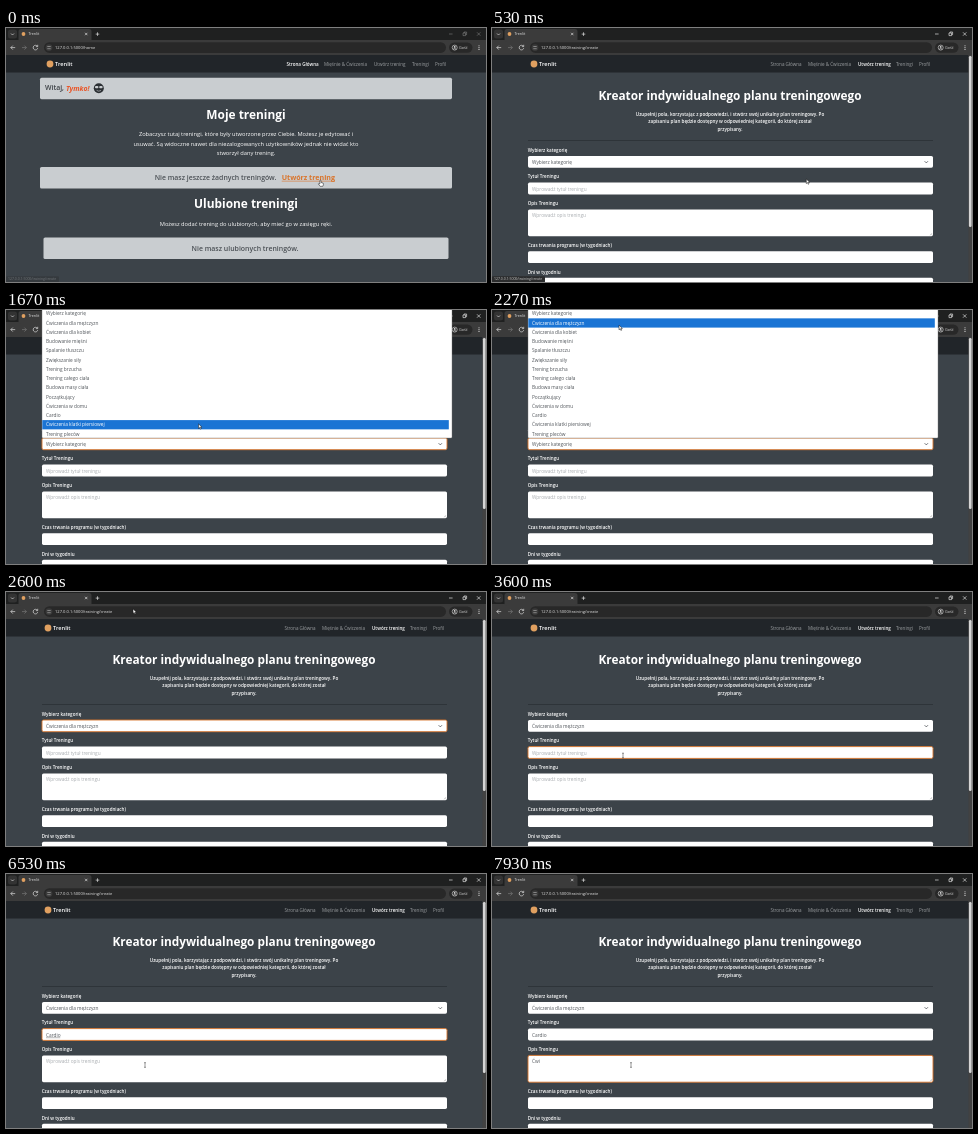
An HTML page that plays this animation: 480x254 px, repeating every 8000 ms.

```html
<!DOCTYPE html>
<html lang="pl">
<head>
<meta charset="utf-8">
<title>Trenlit</title>
<style>
html, body { margin: 0; height: 100%; overflow: hidden; background: #3c4349; }
svg { display: block; width: 100vw; height: 100vh; }
text { font-family: "Open Sans", "Noto Sans", sans-serif; white-space: pre; }
</style>
</head>
<body>
<svg id="stage" viewBox="0 0 480 254"></svg>
<script>
const W = '#fff', DARK = '#212529', BG = '#3c4349', GREY = '#9da0a3';
const ORANGE = '#d9742b', SKIN = '#e0a060', INK = '#50555a', HINT = '#a9adb1';
const LOOP = 8000;

// y is the middle of the capitals
const text = (x, y, s, size, fill = W, weight = 400, extra = '') =>
  `<text x="${x}" y="${y + size * .36}" font-size="${size}" fill="${fill}" font-weight="${weight}" ${extra}>${s}</text>`;
const mid = (x, y, s, size, fill, weight) =>
  text(x, y, s, size, fill, weight, 'text-anchor="middle"');
const rect = (x, y, w, h, fill, r = 0, extra = '') =>
  `<rect x="${x}" y="${y}" width="${w}" height="${h}" rx="${r}" fill="${fill}" ${extra}/>`;
const line = (d, stroke = '#ddd', width = .7) =>
  `<path d="${d}" fill="none" stroke="${stroke}" stroke-width="${width}"/>`;
const dot = (x, y, r, fill) => `<circle cx="${x}" cy="${y}" r="${r}" fill="${fill}"/>`;
const group = (id, body) => `<g id="${id}">${body}</g>`;

const navItems = [[280.5, 'Strona Główna'], [318, 'Mięśnie &amp; Ćwiczenia'],
  [368, 'Utwórz trening'], [406, 'Treningi'], [429, 'Profil']];
const nav = (active, dx) => rect(0, 27, 480, 17.5, DARK) +
  dot(44 + dx, 36, 3.4, SKIN) + text(49 + dx, 36, 'Trenlit', 5.7, W, 600) +
  navItems.map(([x, s], i) =>
    text(x + dx, 36, s, 4.55, i == active ? W : GREY, i == active ? 600 : 400)).join('');

const browser = rect(0, 0, 480, 13, '#1f2020') + rect(0, 12, 480, 15, '#3b3b3b') +
  rect(2, 1.5, 9, 9, '#333', 2.5) + line('M5 5.5l1.5 1.5 1.5-1.5') +
  rect(12.5, 1, 73, 13, '#3b3b3b', 2.5) + dot(17.5, 6, 1.9, SKIN) +
  text(22.5, 6, 'Trenlit', 3.7, '#e8e8e8') +
  line('M79 4.8l2.4 2.4m0-2.4l-2.4 2.4M91.5 4.3v3.6m-1.8-1.8h3.6') +
  group('winButtons', line('M443 6h3.6M457 5h2.6v2.6h-2.6zM458 5v-1h2.6v2.6h-1M471 4.3l3.4 3.4m0-3.4l-3.4 3.4')) +
  line('M9.2 19.6H4.8m2-2l-2 2 2 2') +
  line('M16 19.6h4.4m-2-2l2 2-2 2', '#777') +
  line('M31.3 18.2a2.3 2.3 0 1 0 .4 2M31.7 16.8v1.8h-1.8') +
  rect(38, 14.3, 402, 10.6, '#282828', 5.3) + dot(43, 19.6, 3.4, '#3b3b3b') +
  line('M41.3 18.5h3.4m-3.4 2.2h3.4', '#ccc', .5) +
  `<text id="url" x="49" y="21.1" font-size="4.1" fill="#e4e4e4"></text>` +
  rect(443, 14.4, 23.5, 10.4, '#282828', 5.2) +
  `<circle cx="448.7" cy="19.6" r="2.5" fill="none" stroke="#ddd" stroke-width=".6"/>` +
  dot(448.7, 18.9, .9, '#ddd') + line('M447.2 21.2q1.5-1.3 3 0') + text(453, 19.6, 'Gość', 3.8, '#ddd') +
  [17.8, 19.6, 21.4].map(y => dot(473, y, .55, '#ddd')).join('');

const alertBox = (x, y, w) => rect(x, y, w, 21.5, '#c9cdd0', 1.6);
const home = rect(0, 27, 480, 227, BG) + nav(0, 0) +
  alertBox(34, 49.7, 412) + text(39, 60, 'Witaj,', 6.9, '#3d4246', 600) +
  text(60, 60, 'Tymko!', 7, '#ea5426', 700, 'font-style="italic"') +
  dot(92.8, 60.2, 5, '#2b2f33') + rect(89, 58, 3.4, 2.2, '#c9cdd0', .9) +
  rect(93.2, 58, 3.4, 2.2, '#c9cdd0', .9) + line('M90.6 62.4q2.2 1.6 4.4 0', '#c9cdd0', .6) +
  mid(240, 87, 'Moje treningi', 11.9, W, 700) +
  ['Zobaczysz tutaj treningi, które były utworzone przez Ciebie. Możesz je edytować i',
   'usuwać. Są widoczne nawet dla niezalogowanych użytkowników jednak nie widać kto',
   'stworzył dany trening.'].map((s, i) => mid(240, 106.3 + i * 9.4, s, 5.73)).join('') +
  alertBox(34, 139, 412) + text(148.7, 149.3, 'Nie masz jeszcze żadnych treningów.', 6.9, '#4b5055', 600) +
  text(275.7, 149.3, 'Utwórz trening', 7.1, ORANGE, 700) + rect(275.7, 152.8, 53.3, .6, ORANGE) +
  mid(240, 176, 'Ulubione treningi', 11.9, W, 700) +
  mid(240, 196, 'Możesz dodać trening do ulubionych, aby mieć go w zasięgu ręki.', 5.73) +
  alertBox(37.5, 209.5, 405) + mid(239, 220, 'Nie masz ulubionych treningów.', 6.95, '#4b5055', 600);

const field = (id, y, h) => rect(36, y, 405, h, W, 1.6, `id="${id}" stroke-width=".9"`);
const value = (id, y) => `<text id="${id}" x="40" y="${y + 1.7}" font-size="4.77"></text>`;
const form = rect(0, 27, 480, 227, BG) + nav(2, -2) +
  mid(238, 67.5, 'Kreator indywidualnego planu treningowego', 11.82, W, 700) +
  ['Uzupełnij pola, korzystając z podpowiedzi, i stwórz swój unikalny plan treningowy. Po',
   'zapisaniu plan będzie dostępny w odpowiedniej kategorii, do której został',
   'przypisany.'].map((s, i) => mid(238, 86.2 + i * 7.5, s, 4.62, W, 600)).join('') +
  rect(36, 112.2, 405, .6, '#262b30') +
  [[122, 'Wybierz kategorię'], [148.8, 'Tytuł Treningu'], [175.5, 'Opis Treningu'],
   [217, 'Czas trwania programu (w tygodniach)'], [244, 'Dni w tygodniu']]
    .map(([y, s]) => text(35.7, y, s, 4.55, W, 600)).join('') +
  field('select', 128, 11.7) + field('title', 154.6, 11.8) + field('about', 181.4, 26.8) +
  field('weeks', 223.2, 11.7) + field('days', 249.7, 11.7) +
  line('M432.6 133.2l1.7 1.7 1.7-1.7', '#343a40', .7) + line('M440 205.2l-2 2m2-1l-1 1', '#888', .4) +
  value('selectText', 134) + value('titleText', 160.8) + value('aboutText', 187.5) +
  rect(40, 163.6, 14.2, .5, '#777', 0, 'id="underline"') +
  rect(476.4, 27, 3.6, 227, '#424242') + rect(476.9, 28, 2.7, 171, '#d5d5d5', 1.3);

const options = ['Wybierz kategorię', 'Ćwiczenia dla mężczyzn', 'Ćwiczenia dla kobiet', 'Budowanie mięśni',
  'Spalanie tłuszczu', 'Zwiększanie siły', 'Trening brzucha', 'Trening całego ciała', 'Budowa masy ciała',
  'Początkujący', 'Ćwiczenia w domu', 'Cardio', 'Ćwiczenia klatki piersiowej', 'Trening pleców'];
const ROW = 9.25;
const popup = rect(36, -2, 410, 130, W, 1, 'stroke="#777" stroke-width=".4"') +
  group('rows', rect(36.3, 0, 406.5, ROW, '#1a74d4', 0, 'id="mark"') +
    options.map((s, i) => text(40, 3.7 + i * ROW, s, 4.77, INK, 400, 'class="option"')).join(''));

const outline = 'stroke="#111" stroke-width=".5" stroke-linejoin="round"';
const cursors =
  group('arrow', `<path d="M0 0v4.6l1.1-1 .8 1.7.8-.4-.8-1.6h1.5z" fill="#fff" ${outline}/>`) +
  group('hand', `<path d="M-.6 0q.6-.6 1.1 0v2l2.2.6q.6 1.8-.4 3.2h-2.6l-1.9-2.4q.4-.8 1.6 0z" fill="#fff" ${outline}/>`) +
  group('beam', line('M-1-2.3h2M0-2.3v4.6M-1 2.3h2', '#333', .5));

const stage = document.getElementById('stage');
stage.innerHTML = group('form', form) + group('home', home) + browser +
  group('status', rect(0, 248.2, 53, 6, '#2b2c2d', .8) + text(2, 251.2, '127.0.0.1:5000/training/create', 3.45, '#ccc')) +
  group('popup', popup) + group('cursor', cursors);

const $ = id => document.getElementById(id);
const show = (id, on) => $(id).style.display = on ? '' : 'none';
const write = (id, s, fill = INK) => { $(id).textContent = s; $(id).setAttribute('fill', fill); };
const clamp = (v, a = 0, b = 1) => Math.min(b, Math.max(a, v));
const optionTexts = [...document.querySelectorAll('.option')];

// time, x, y of the pointer
const path = [[0, 314.5, 152.5], [530, 314.3, 151], [1130, 220, 134.5], [1400, 220, 134.5], [1730, 190, 112],
  [2250, 127, 15.2], [2550, 127, 15.2], [3330, 131, 156], [3500, 131, 163.5], [3670, 131, 163.5],
  [4200, 58, 170], [4530, 50, 172], [4870, 50, 172]];
function pointer(t) {
  if (t >= 6530) return [139, 191];
  const i = path.findIndex(p => p[0] > t);
  if (i < 0) return [50, 172];
  const [a, b] = [path[i - 1], path[i]];
  const k = clamp((t - a[0]) / (b[0] - a[0])), e = k * k * (3 - 2 * k);
  return [a[1] + (b[1] - a[1]) * e, a[2] + (b[2] - a[2]) * e];
}
const typed = (s, t, start, step) => s.slice(0, Math.max(0, Math.floor((t - start) / step) + 1));

function draw(t) {
  const [x, y] = pointer(t), onHome = t < 300;
  show('home', onHome);
  write('url', '127.0.0.1:5000/' + (onHome ? 'home' : 'training/create'), '#e4e4e4');
  $('winButtons').style.opacity = t < 70 ? .4 : 1;
  $('status').style.opacity = Math.min(clamp(.35 + t / 200), clamp((1000 - t) / 70));

  const open = t >= 1200 && t < 2600;
  show('popup', open);
  if (open) {
    const entered = y < 128, off = entered ? 0 : 1.6;
    const row = entered ? clamp(Math.floor((y + .9) / ROW), 0, options.length - 1) : 0;
    $('rows').setAttribute('transform', `translate(0 ${off})`);
    $('mark').setAttribute('y', row * ROW - .9);
    optionTexts.forEach((o, i) => o.setAttribute('fill', i == row ? W : INK));
  }

  const focus = t < 1130 ? '' : t < 3470 ? 'select' : t < 6670 ? 'title' : 'about';
  for (const id of ['select', 'title', 'about'])
    $(id).setAttribute('stroke', id == focus ? ORANGE : 'none');
  write('selectText', options[t < 2600 ? 0 : 1]);
  const title = typed('Cardio', t, 4870, 130), about = typed('Ćwi', t, 7330, 270);
  write('titleText', title || 'Wprowadź tytuł treningu', title ? INK : HINT);
  write('aboutText', about || 'Wprowadź opis treningu', about ? INK : HINT);
  show('underline', t >= 6530 && t < 6670);

  const beam = t >= 3400;
  show('cursor', t < 4870 || t >= 6530);
  show('hand', onHome);
  show('arrow', !onHome && !beam);
  show('beam', beam);
  $('cursor').setAttribute('transform', `translate(${x} ${y})`);
}

const begin = performance.now();
function tick() {
  draw((performance.now() - begin) % LOOP);
  requestAnimationFrame(tick);
}
tick();
</script>
</body>
</html>
```
